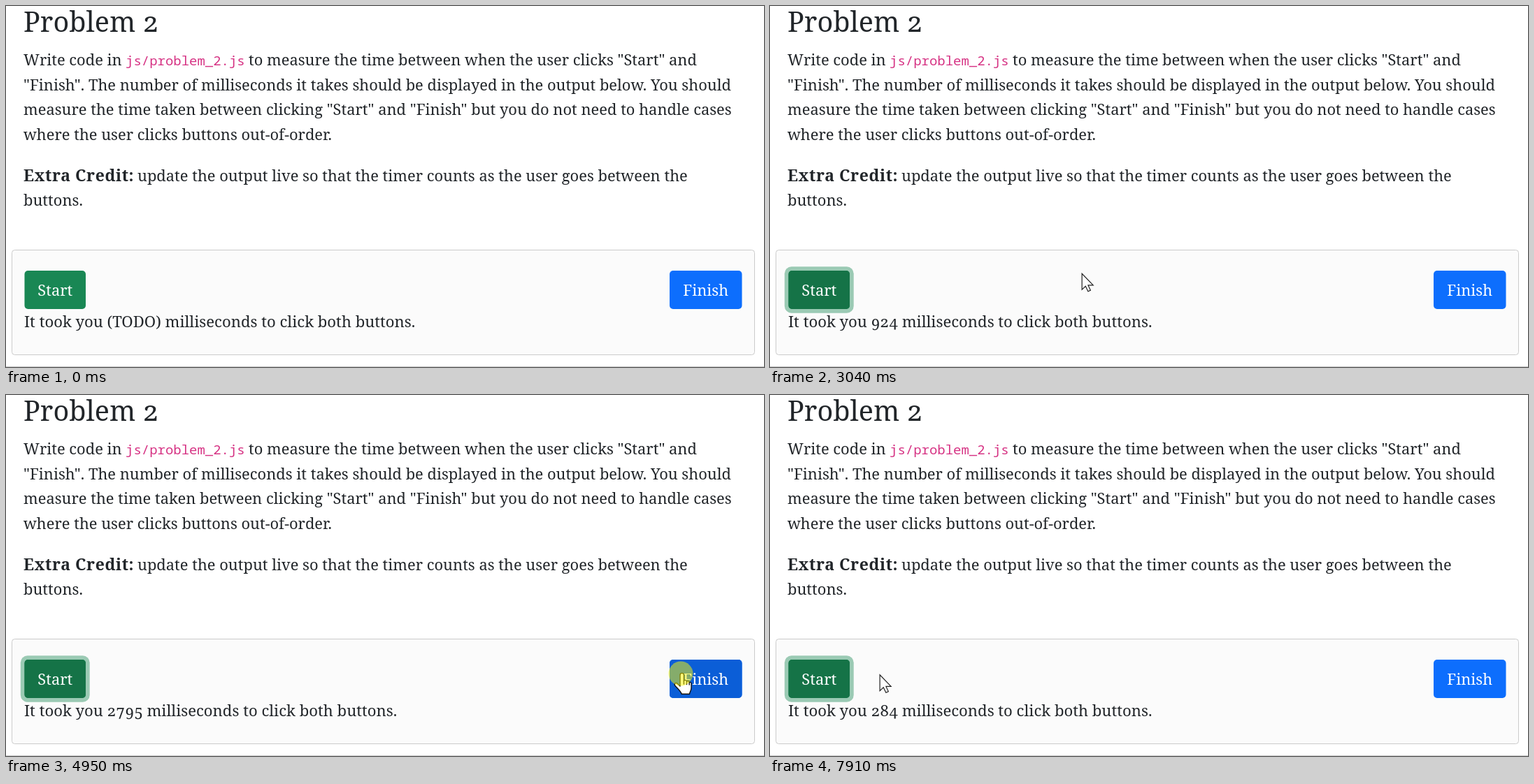
Write an HTML page that moves like this. It is 1084 px wide and 517 px high and loops after 7990 ms.

```html
<!DOCTYPE html>
<html lang="en">
<head>
<meta charset="utf-8">
<title>Problem 2</title>
<style>
html, body { margin: 0; width: 100%; height: 100%; overflow: hidden; background: #fff; }
svg { display: block; width: 100%; height: 100%; }
text { font: 21.9px "Noto Serif", "Liberation Serif", serif; font-variant-numeric: oldstyle-nums; fill: #212529; }
.title { font-size: 39.5px; }
.bold { font-size: 23px; font-weight: 700; letter-spacing: .6px; }
.code { font: 18.98px "Noto Sans Mono", monospace; fill: #d63384; }
.label { fill: #fff; text-anchor: middle; }
#output { font-size: 22.1px; }
</style>
</head>
<body>
<svg viewBox="0 0 1084 517" xmlns="http://www.w3.org/2000/svg">
  <rect width="1084" height="517" fill="#fff"/>
  <text class="title" x="25" y="37">Problem 2</text>
  <text x="25" y="85">Write code in</text>
  <text class="code" x="171" y="85">js/problem_2.js</text>
  <text x="347" y="85">to measure the time between when the user clicks "Start" and</text>
  <text x="25" y="121">"Finish". The number of milliseconds it takes should be displayed in the output below. You should</text>
  <text x="25" y="156">measure the time taken between clicking "Start" and "Finish" but you do not need to handle cases</text>
  <text x="25" y="192">where the user clicks buttons out-of-order.</text>
  <text class="bold" x="25" y="251">Extra Credit:</text>
  <text x="188" y="251">update the output live so that the timer counts as the user goes between the</text>
  <text x="25" y="286">buttons.</text>

  <rect x="8.5" y="349.5" width="1062" height="150" rx="4" fill="#fbfbfb" stroke="#cbcbcb"/>
  <path d="M0 516.5H1084" stroke="#cbcbcb"/>
  <g id="buttons"></g>
  <text id="output" x="26" y="460"></text>

  <g id="pointer">
    <path id="arrow" d="M.6.8V23.6L5.7 18.8L9.3 26.2L12.8 24.6L9.4 17.4H16.6Z" fill="#fff" stroke="#222" stroke-width="1.2"/>
    <g id="hand" fill="#fff" stroke="#111" stroke-width="1.4" stroke-linejoin="round" stroke-linecap="round">
      <path d="M-1 2Q-1-.6 1.7-.6T4.4 2V10.5C5.2 8.8 8 9 8.5 11.3C9.4 9.8 12 10.4 12.2 12.6C13.2 11.6 15 12.6 15 14.6V20.5C15 24.5 12.8 25.5 12.5 29.3H1.2C.5 25.5-5 21-8.4 17C-10 14.2-7 12.3-4.7 14.4L-1 18Z"/>
      <path d="M4.4 10.5V15M8.5 11.3V15.5M12.2 12.6V16" fill="none"/>
    </g>
    <circle id="click" r="17.5" fill="#fffa00"/>
  </g>
</svg>
<script>
const $ = id => document.getElementById(id);
const LOOP = 7990, STEP = 68.5, LAST = 88;

// Each burst of activity: start in ms and its first step
const BURSTS = [[930, 1], [1950, 12], [5900, 63], [7470, 82]];
const PRESSES = [12, 56, 82];

// Key points of the pointer: step, x, y
const PATH = [[1, 120, 506], [11, 61, 403], [14, 61, 403], [21, 170.5, 414], [35, 730, 356.5],
  [44, 965, 399], [62, 965, 399], [69, 308.5, 467], [74, 97, 485], [81, 62, 403], [84, 62, 403], [88, 156.5, 400]];

// Timer readings: step, milliseconds
const TIMER = [[14, 0], [21, 461], [35, 1387], [44, 1986], [56, 2795], [60, 3013]];

function add(name, attrs) {
  const el = document.createElementNS('http://www.w3.org/2000/svg', name);
  for (const key in attrs) el.setAttribute(key, attrs[key]);
  return $('buttons').appendChild(el);
}

function button(x, width, label, ringColor, color, dark) {
  const ring = add('rect', { x: x - 5.7, y: 373.3, width: width + 11.4, height: 66.4, rx: 10, fill: ringColor });
  add('rect', { x, y: 379, width, height: 55, rx: 5, fill: color });
  const shade = add('rect', { x, y: 379, width, height: 55, rx: 5, fill: dark });
  add('text', { x: x + width / 2, y: 415, class: 'label' }).textContent = label;
  return {
    show(darkness, focus) {
      shade.setAttribute('opacity', darkness);
      ring.setAttribute('opacity', focus);
    },
    holds: (px, py) => px > x && px < x + width && py > 379 && py < 434
  };
}
const start = button(26.5, 87.5, 'Start', '#9bcab4', '#198754', '#157347');
const finish = button(949, 103.5, 'Finish', '#96bffc', '#0d6efd', '#0b5ed7');

function stepAt(t) {
  let step = 0;
  BURSTS.forEach(([from, first], i) => {
    const end = i + 1 < BURSTS.length ? BURSTS[i + 1][1] - 1 : LAST;
    if (t >= from) step = Math.min(end, first + Math.floor((t - from) / STEP + 0.4));
  });
  return step;
}

const clamp = u => Math.min(1, Math.max(0, u));
const ramp = (k, from, length = 2) => clamp((k - from) / length);

function span(keys, k) {
  let i = 0;
  while (i < keys.length - 2 && k >= keys[i + 1][0]) i++;
  return [i, ramp(k, keys[i][0], keys[i + 1][0] - keys[i][0])];
}

function linear(keys, k) {
  const [i, u] = span(keys, k);
  return keys[i][1] + (keys[i + 1][1] - keys[i][1]) * u;
}

// Speed through a key point; zero where the pointer rests
function slope(keys, i, axis) {
  const p = keys[i - 1], c = keys[i], n = keys[i + 1];
  if (!p || !n || p[axis] === c[axis] || n[axis] === c[axis]) return 0;
  return (n[axis] - p[axis]) / (n[0] - p[0]);
}

function smooth(keys, k, axis) {
  const [i, u] = span(keys, k), a = keys[i], b = keys[i + 1];
  const bend = (1 - u) * slope(keys, i, axis) - u * slope(keys, i + 1, axis);
  return a[axis] + (b[axis] - a[axis]) * u * u * (3 - 2 * u) + (b[0] - a[0]) * u * (1 - u) * bend;
}

function reading(k) {
  if (k < 15) return '(TODO)';
  return k < 85 ? Math.round(linear(TIMER, k)) : 71 * (k - 84);
}

function draw(k) {
  $('output').textContent = `It took you ${reading(k)} milliseconds to click both buttons.`;
  start.show(ramp(k, 6) - ramp(k, 56) + ramp(k, 78), ramp(k, 12) - ramp(k, 56) + ramp(k, 82));
  finish.show(ramp(k, 43) - ramp(k, 82), ramp(k, 56) - ramp(k, 82));

  const x = smooth(PATH, k, 1), y = smooth(PATH, k, 2);
  const over = start.holds(x, y) || finish.holds(x, y);
  const press = PRESSES.reduce((sum, p) => sum + ramp(k, p - 1, 1) - ramp(k, p + 3), 0);
  $('pointer').setAttribute('display', k ? 'inline' : 'none');
  $('pointer').setAttribute('transform', `translate(${x.toFixed(2)} ${y.toFixed(2)})`);
  $('arrow').setAttribute('display', over ? 'none' : 'inline');
  $('hand').setAttribute('display', over ? 'inline' : 'none');
  $('click').setAttribute('opacity', press / 2);
}

const began = performance.now();
let shown = -1;
function tick() {
  const k = stepAt((performance.now() - began) % LOOP);
  if (k !== shown) draw(shown = k);
  requestAnimationFrame(tick);
}
tick();
</script>
</body>
</html>
```
